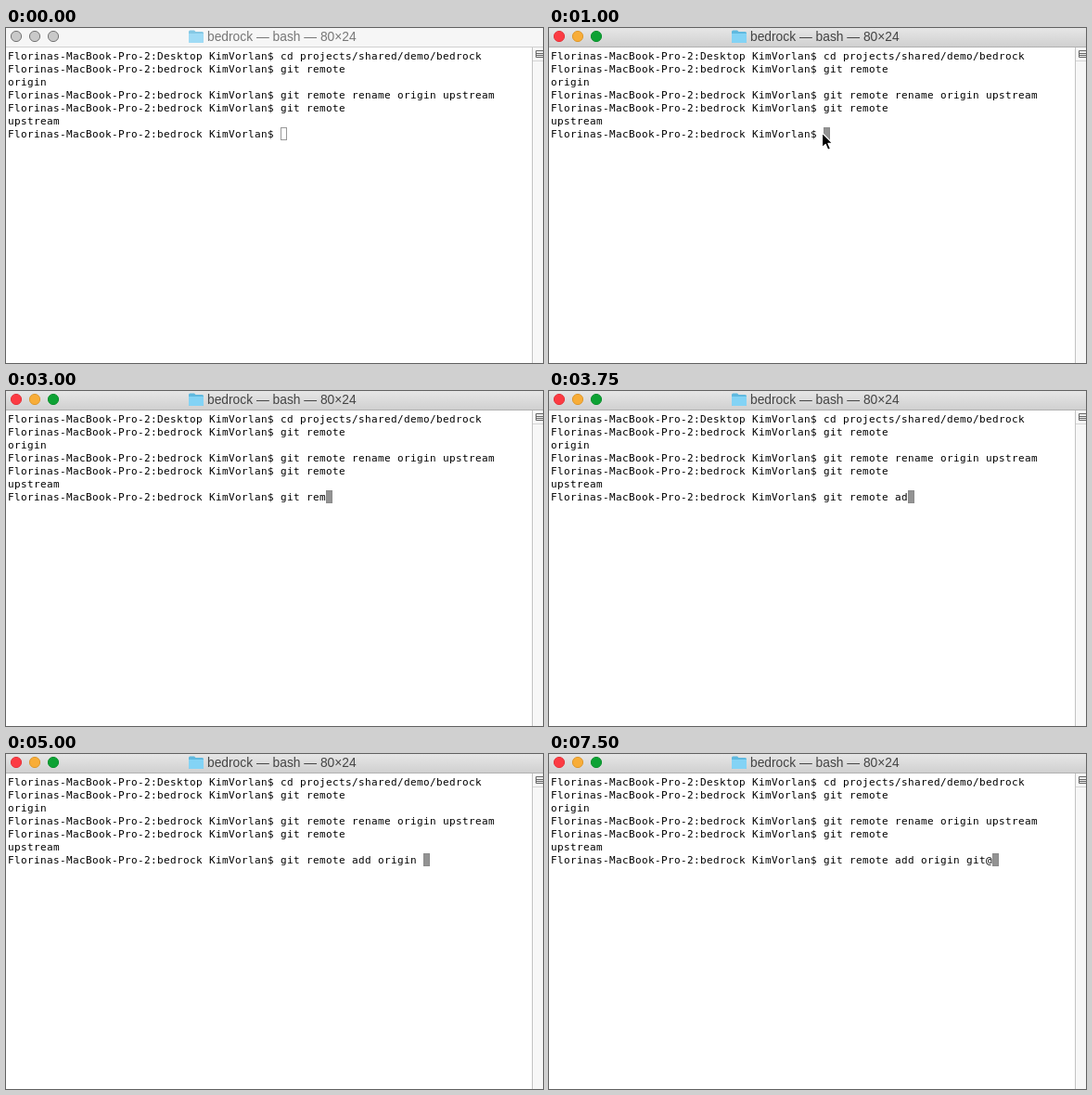
An HTML page that plays this animation: 579 by 361 pixels, repeating every 8000 ms.

```html
<!DOCTYPE html>
<html lang="en">
<head>
<meta charset="utf-8">
<title>Terminal</title>
<style>
  html, body { margin: 0; width: 100%; height: 100%; overflow: hidden; background: #fff; }
  svg { display: block; width: 579px; height: 361px; }
  .term text { font: 11px "DejaVu Sans Mono", monospace; fill: #000; white-space: pre; }
  .title { font: 13.8px "Liberation Sans", Arial, sans-serif; fill: #444; }
  .bar { fill: url(#active); }
  .light { stroke-width: 1; }
  .edge { fill: #b1b1b1; }
  .cursor { fill: #939393; stroke: #8b8b8b; }
  .idle .bar { fill: #f6f6f6; }
  .idle .edge { fill: #d0d0d0; }
  .idle .title { fill: #777; }
  .idle .folder { opacity: .75; }
  .idle .light { fill: #c9c9c9; stroke: #757575; }
  .idle .cursor { fill: #fff; stroke: #999; }
</style>
</head>
<body>
<svg id="stage" viewBox="0 0 579 361" class="idle">
  <defs>
    <linearGradient id="active" x2="0" y2="1">
      <stop stop-color="#e6e6e6"/><stop offset="1" stop-color="#d0d0d0"/>
    </linearGradient>
  </defs>
  <rect width="579" height="361" fill="#fff"/>

  <rect class="bar" width="579" height="20"/>
  <rect class="edge" y="20" width="579" height="1"/>
  <circle class="light" cx="11" cy="9" r="5.6" fill="#fc3b43" stroke="#e5343b"/>
  <circle class="light" cx="31" cy="9" r="5.6" fill="#f8ad38" stroke="#de982c"/>
  <circle class="light" cx="51" cy="9" r="5.6" fill="#0da234" stroke="#0b902d"/>
  <g class="folder">
    <path d="M197 4q0-1.500 1.500-1.500h4.500l1.500 1.500h7q1.500 0 1.500 1.500v9q0 1.500-1.500 1.500h-13q-1.500 0-1.500-1.500z" fill="#5fb9df"/>
    <path d="M197 6h16v8.500q0 1.500-1.500 1.500h-13q-1.500 0-1.500-1.500z" fill="#83d3f5"/>
  </g>
  <text class="title" x="217" y="14">bedrock — bash — 80×24</text>

  <rect x="567" y="21" width="12" height="340" fill="#f7f7f7"/>
  <rect x="567" y="21" width="1" height="340" fill="#c3c3c3"/>
  <rect x="568" y="35" width="11" height="1" fill="#d4d4d4"/>
  <path d="M571.500 24.500h8v7h-8zM572 27.500h7M572 29.500h7" fill="#eee" stroke="#666"/>

  <rect class="cursor" id="cursor" x="296.500" y="107.500" width="6" height="13"/>
  <g class="term" id="term"></g>

  <path id="pointer" d="M0 0V15.800L3.700 12.400L6.200 18.300L9 17.100L6.500 11.400H11.300Z"
        fill="#000" stroke="#fff" stroke-width="1.200" stroke-linejoin="round"/>
</svg>
<script>
const LOOP = 8000, CELL = 7, ROW = 14, LEFT = 2, TOP = 23, FOCUS_AT = 1000;
const COMMAND = 'git remote add origin git@';
const prompt = dir => `Florinas-MacBook-Pro-2:${dir} KimVorlan$ `;
const LINES = [
  prompt('Desktop') + 'cd projects/shared/demo/bedrock',
  prompt('bedrock') + 'git remote',
  'origin',
  prompt('bedrock') + 'git remote rename origin upstream',
  prompt('bedrock') + 'git remote',
  'upstream',
  prompt('bedrock')
];

// [time, characters typed]
const TYPING = [
  [0, 0], [2500, 2], [2750, 4], [3000, 7], [3250, 10], [3500, 11], [3750, 13],
  [4000, 15], [4250, 17], [4500, 20], [4750, 21], [5000, 22], [5500, 24],
  [5750, 25], [6500, 26]
];
// [time, tip position or nothing]
const POINTER = [
  [0, null], [250, [374, 31]], [500, [335, 73]], [750, [295.5, 112]],
  [1000, [294.5, 113]], [1250, [326.5, -15.5]], [1500, null]
];

const byId = id => document.getElementById(id);
const stage = byId('stage'), term = byId('term');
const cursor = byId('cursor'), pointer = byId('pointer');

// Every glyph sits on the terminal's whole-pixel grid.
function setText(node, text, column = 0) {
  node.setAttribute('x', Array.from(text, (_, i) => LEFT + (column + i) * CELL).join(' '));
  node.textContent = text;
}

function addLine(text, row, column) {
  const node = document.createElementNS('http://www.w3.org/2000/svg', 'text');
  node.setAttribute('y', TOP + row * ROW + 11);
  setText(node, text, column);
  term.append(node);
  return node;
}

const valueAt = (steps, time) => steps.findLast(([start]) => start <= time)[1];

LINES.forEach((text, row) => addLine(text, row));
const lastRow = LINES.length - 1;
const column = LINES[lastRow].length;
const input = addLine('', lastRow, column);
let shown = 0;

function draw(now) {
  const time = now % LOOP;
  const typed = valueAt(TYPING, time);
  const tip = valueAt(POINTER, time);

  stage.classList.toggle('idle', time < FOCUS_AT);
  if (typed !== shown) {
    setText(input, COMMAND.slice(0, typed), column);
    shown = typed;
  }
  cursor.setAttribute('x', LEFT + (column + typed) * CELL + 0.5);
  pointer.style.display = tip ? '' : 'none';
  if (tip) pointer.setAttribute('transform', `translate(${tip})`);
}

const start = performance.now();
function frame() {
  draw(performance.now() - start);
  requestAnimationFrame(frame);
}
frame();
</script>
</body>
</html>
```
